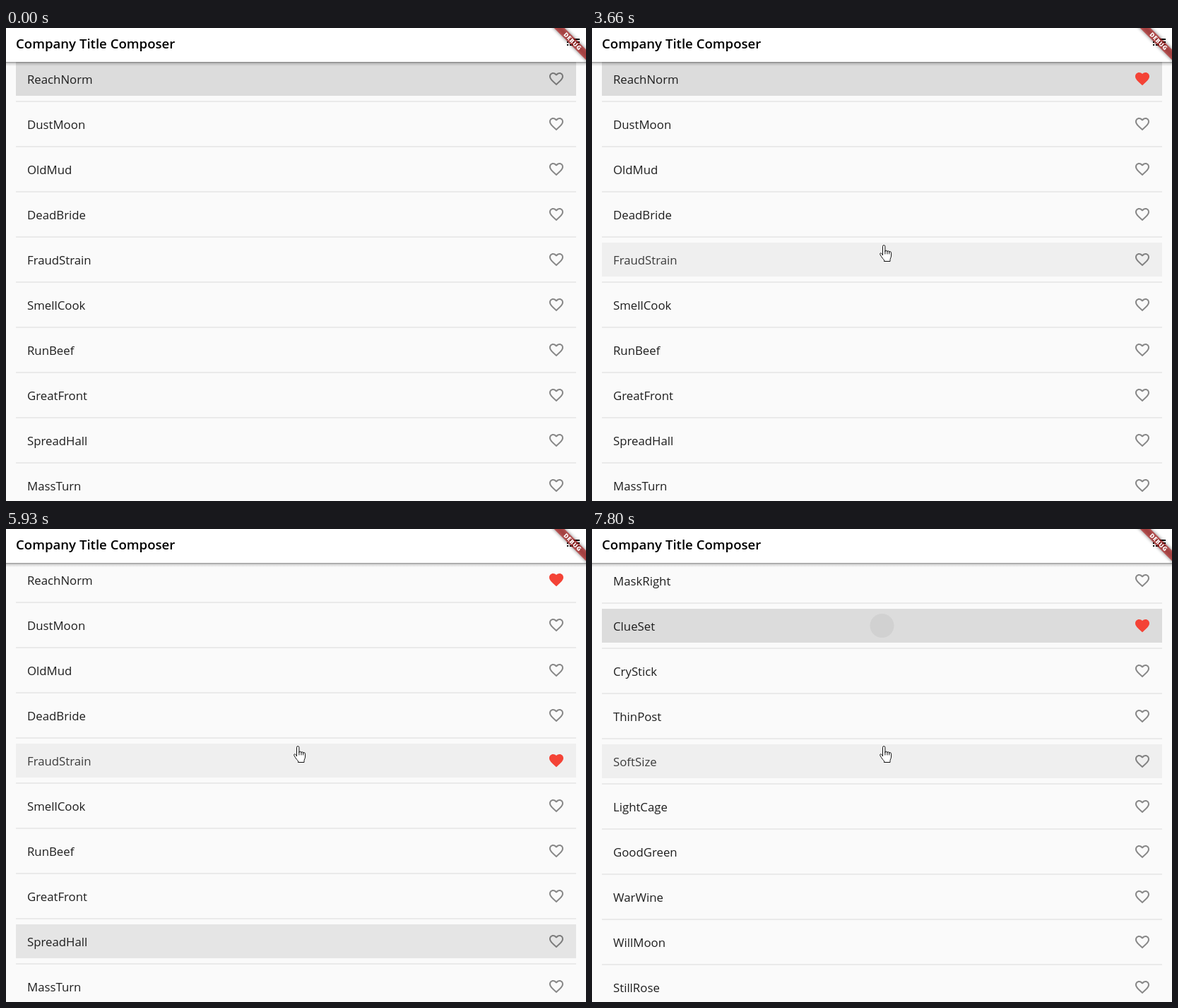
Recreate the animation shown at these times as an HTML page. Size 821 px wide and 670 px high, loop 8 s.

```html
<!DOCTYPE html>
<html lang="en">
<head>
<meta charset="utf-8">
<title>Name list</title>
<style>
  html, body { margin: 0; width: 100%; height: 100%; overflow: hidden; background: #fafafa; }
  svg { display: block; font-family: "Open Sans", "Noto Sans", sans-serif; }
  .row text { font-size: 16.8px; }
  .title { font-size: 18.6px; font-weight: 600; }
  .debug { font-size: 8.4px; font-weight: 800; letter-spacing: .6px; }
</style>
</head>
<body>
<svg width="821" height="670" viewBox="0 0 821 670">
  <defs>
    <linearGradient id="shade" x2="0" y2="1">
      <stop offset="0" stop-opacity=".42"/>
      <stop offset=".4" stop-opacity=".14"/>
      <stop offset="1" stop-opacity="0"/>
    </linearGradient>
    <filter id="blur" x="-20%" y="-80%" width="140%" height="260%"><feGaussianBlur stdDeviation="2.4"/></filter>
    <clipPath id="rowClip"><rect x="14" y="48" width="793" height="48"/></clipPath>
  </defs>
  <rect width="821" height="670" fill="#fafafa"/>
  <g id="list"></g>
  <rect y="48" width="821" height="6" fill="url(#shade)"/>
  <rect width="821" height="48" fill="#fff"/>
  <text class="title" x="14" y="29">Company Title Composer</text>
  <path transform="translate(791 8)" d="M3 13h2v-2H3zm0 4h2v-2H3zm0-8h2V7H3zm4 4h14v-2H7zm0 4h14v-2H7zM7 7v2h14V7z"/>
  <g transform="translate(821 0) rotate(45)">
    <rect x="-45" y="21.5" width="90" height="10.5" opacity=".5" filter="url(#blur)"/>
    <rect x="-45" y="21.5" width="90" height="10.5" fill="#b71c1c" fill-opacity=".63"/>
    <text class="debug" y="29.8" text-anchor="middle" fill="#fff">DEBUG</text>
  </g>
  <g id="cursor" stroke="#111" stroke-linecap="round" stroke-linejoin="round">
    <path fill="#fff" d="M4.5 14.5V2.4a1.7 1.7 0 0 1 3.4 0V9.5Q8 8.2 9.4 8.2T11 9.7Q11.2 8.7 12.4 8.8T13.8 10.3Q14 9.5 15.1 9.7 16.6 9.9 16.6 11.7V15Q16.6 17 15.8 18.6T15 21.5V23.5H6.5V21.5Q4.5 20 2.5 16.6L.8 13.7Q.2 12.3 1.3 11.9T3.5 13.1Z"/>
    <path fill="none" d="M7.9 9v4M11 9.7v3.3M13.8 10.3v2.7"/>
  </g>
</svg>
<script>
const LOOP = 8000, ROW = 64;
const names = ("ReachNorm DustMoon OldMud DeadBride FraudStrain SmellCook RunBeef GreatFront SpreadHall MassTurn " +
  "GiftNorth MaskRight ClueSet CryStick ThinPost SoftSize LightCage GoodGreen WarWine WillMoon StillRose").split(" ");
const HEART = "M12 21.35l-1.45-1.32C5.4 15.36 2 12.28 2 8.5 2 5.42 4.42 3 7.5 3c1.74 0 3.41.81 4.5 2.09C13.09 3.81 14.76 3 16.5 3 19.58 3 22 5.42 22 8.5c0 3.78-3.4 6.86-8.55 11.54z";
const HOLLOW = "M16.5 3c-1.74 0-3.41.81-4.5 2.09C10.91 3.81 9.24 3 7.5 3 4.42 3 2 5.42 2 8.5c0 3.78 3.4 6.86 8.55 11.54L12 21.35l1.45-1.32C18.6 15.36 22 12.28 22 8.5 22 5.42 19.58 3 16.5 3zm-4.4 15.55l-.1.1-.1-.1C7.14 14.24 4 11.39 4 8.5 4 6.5 5.5 5 7.5 5c1.54 0 3.04.99 3.57 2.36h1.87C13.46 5.99 14.96 5 16.5 5c2 0 3.5 1.5 3.5 3.5 0 2.89-3.14 5.74-7.9 10.05z";

const list = document.getElementById("list");
const cursor = document.getElementById("cursor");

function add(parent, tag, attrs) {
  const el = document.createElementNS("http://www.w3.org/2000/svg", tag);
  set(el, attrs);
  return parent.appendChild(el);
}
function set(el, attrs) {
  for (const key in attrs) el.setAttribute(key, attrs[key]);
}

const rows = names.map((name, i) => {
  const g = add(list, "g", { class: "row", transform: `translate(0 ${i * ROW})` });
  const tint = add(g, "rect", { x: 14, y: 48, width: 793, height: 48 });
  const clip = add(g, "g", { "clip-path": "url(#rowClip)" });
  const splash = add(clip, "circle", { r: 0 });
  add(g, "rect", { x: 14, y: 103, width: 793, height: 2, fill: "#eaeaea" });
  const text = add(g, "text", { x: 30, y: 79 });
  text.textContent = name;
  const heart = add(g, "path", { transform: "translate(767 60)" });
  return { tint, splash, text, heart };
});

const clamp = v => Math.max(0, Math.min(1, v));
const mix = (a, b, p) => a + (b - a) * p;
const easeOut = p => 1 - (1 - p) ** 2;
const easeInOut = p => p * p * (3 - 2 * p);
// Progress that advances in equal held steps
const stepped = (t, start, size, count) => clamp(Math.floor((t - start) / size) / count);

// Value of the last [time, value] pair already reached
const held = (t, pairs) => pairs.reduce((v, [at, next]) => t >= at ? next : v, null);

function pointer(t) {
  if (t < 90) return null;
  if (t < 2220) return { x: 584, y: 405 };
  if (t < 3280) {
    const p = easeOut(stepped(t, 2220, 91, 8));
    return { x: mix(566, 527, p), y: mix(321, 76, p) };
  }
  const p = easeInOut(stepped(t, 3190, 90, 4));
  return { x: mix(527, 407, p), y: mix(76, 307, p) };
}

const focusSteps = [[0, 0], [5560, 2], [5830, 5], [5920, 8], [6010, 11], [6100, 13], [6190, 16],
  [6290, 18], [6370, 19], [7350, 17], [7440, 14], [7530, 12]];

// Rows scrolled past: the list follows the focus down, but not back up
const scrolled = t => Math.max(0, held(Math.min(t, 7000), focusSteps) - 8);

function hoveredRow(t, top) {
  const p = pointer(t - 90);
  if (!p) return -1;
  const lag = top > 0 && t < 6450 ? 1 : 0;
  return Math.floor((p.y - 40) / ROW) + top - lag;
}

function focusTint(t) {
  if (t >= 5560 && t < 5830) return .044;
  return t >= 5830 && t < 6810 ? .088 : .12;
}

const likedAt = { 0: 3210, 4: 3840, 12: 7800 };

function splashOf(i, t) {
  if (i === 0 && t >= 3030 && t < 3640) {
    return { cx: 533, cy: 77, r: mix(20, 560, clamp((t - 3030) / 300)), opacity: .09 * clamp((3640 - t) / 300) };
  }
  if (i === 12 && t >= 7800) return { cx: 410.5, cy: 72, r: 17, opacity: .05 };
  return { r: 0 };
}

function draw(t) {
  const top = scrolled(t);
  const focus = held(t, focusSteps);
  const hover = hoveredRow(t, top);
  set(list, { transform: `translate(0 ${top ? 1 - top * ROW : 0})` });

  rows.forEach((row, i) => {
    const liked = t >= likedAt[i];
    const tint = i === focus ? focusTint(t) : i === hover ? (t < 6450 && top ? .032 : .044) : 0;
    set(row.tint, { opacity: tint });
    set(row.splash, splashOf(i, t));
    set(row.text, { fill: i === hover && i !== focus ? "#3c3c3c" : "#1e1e1e" });
    set(row.heart, {
      d: liked ? HEART : HOLLOW,
      fill: liked ? "#f44336" : "#000",
      "fill-opacity": liked ? 1 : .46
    });
  });

  const p = pointer(t);
  set(cursor, p
    ? { visibility: "visible", transform: `translate(${p.x.toFixed(1)} ${p.y.toFixed(1)})` }
    : { visibility: "hidden" });
}

const start = performance.now();
function frame() {
  draw((performance.now() - start) % LOOP);
  requestAnimationFrame(frame);
}
frame();
</script>
</body>
</html>
```
